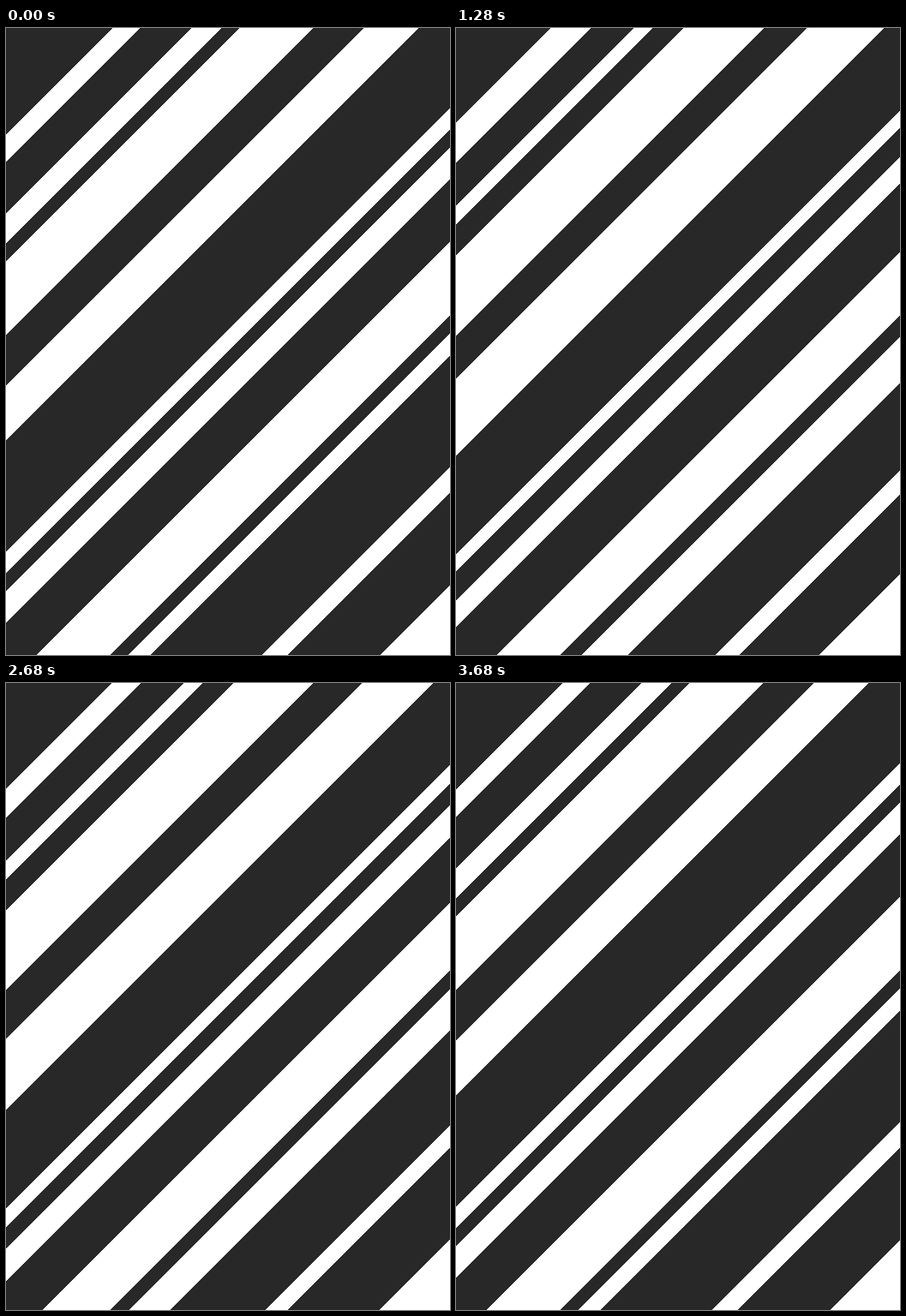
An HTML page with a canvas that plays this animation: 518 px wide and 732 px high, repeating every 3.76 s.

```html
<!DOCTYPE html>
<html lang="en">
<head>
<meta charset="utf-8">
<title>Diagonal stripes</title>
<style>
html, body { margin: 0; width: 100%; height: 100%; overflow: hidden; background: #282828; }
canvas { display: block; }
</style>
</head>
<body>
<canvas id="stage" width="518" height="732"></canvas>
<script>
const W = 518, H = 732, LOOP = 3760, STEP = 40;
const ctx = document.getElementById('stage').getContext('2d');

const clamp = s => Math.min(1, Math.max(0, s));

function ease(t, start, end) {
  const s = clamp((t - start) / (end - start));
  return s * s * (3 - 2 * s);
}

// A swing eases out, holds, and eases back to rest.
const swing = (outStart, outEnd, backStart, backEnd) =>
  t => ease(t, outStart, outEnd) - ease(t, backStart, backEnd);

const still = () => 0;
const early = swing(0, 680, 1840, 2880);
const middle = swing(520, 1880, 2000, 2920);
const brisk = swing(0, 800, 2600, 3400);
const slow = swing(40, 1280, 2020, 3420);
const long = swing(0, 960, 2280, 3420);
const late = swing(0, 960, 2960, 3680);

// An edge is the line x + y = rest + travel * motion(t).
const edge = (rest, travel, motion) => t => Math.round(rest + travel * motion(t));

const stripes = [
  [edge(124, -14, early), edge(156, 1, late)],
  [edge(216, -9, late), edge(251, -22, late)],
  [edge(272, -7, late), edge(358, 2, middle)],
  [edge(417, -14, middle), edge(481, 18, brisk)],
  [edge(611, 3, slow), edge(636, -4, middle)],
  [edge(657, 19, middle), edge(694, 5, long)],
  [edge(767, 12, slow), edge(853, 0, still)],
  [edge(874, 7, middle), edge(900, 32, long)],
  [edge(1030, 4, brisk), edge(1060, 2, early)],
  [edge(1168, -13, early), edge(W + H, 0, still)]
];

function draw(t) {
  ctx.fillStyle = '#282828';
  ctx.fillRect(0, 0, W, H);
  ctx.fillStyle = '#fff';
  for (const [near, far] of stripes) {
    const left = near(t), width = far(t) - left;
    // Row by row keeps the diagonal edges hard.
    for (let y = 0; y < H; y++) ctx.fillRect(left - y, y, width, 1);
  }
}

const begin = performance.now();
function tick() {
  const t = (performance.now() - begin) % LOOP;
  draw(Math.floor(t / STEP) * STEP);
  requestAnimationFrame(tick);
}
tick();
</script>
</body>
</html>
```
